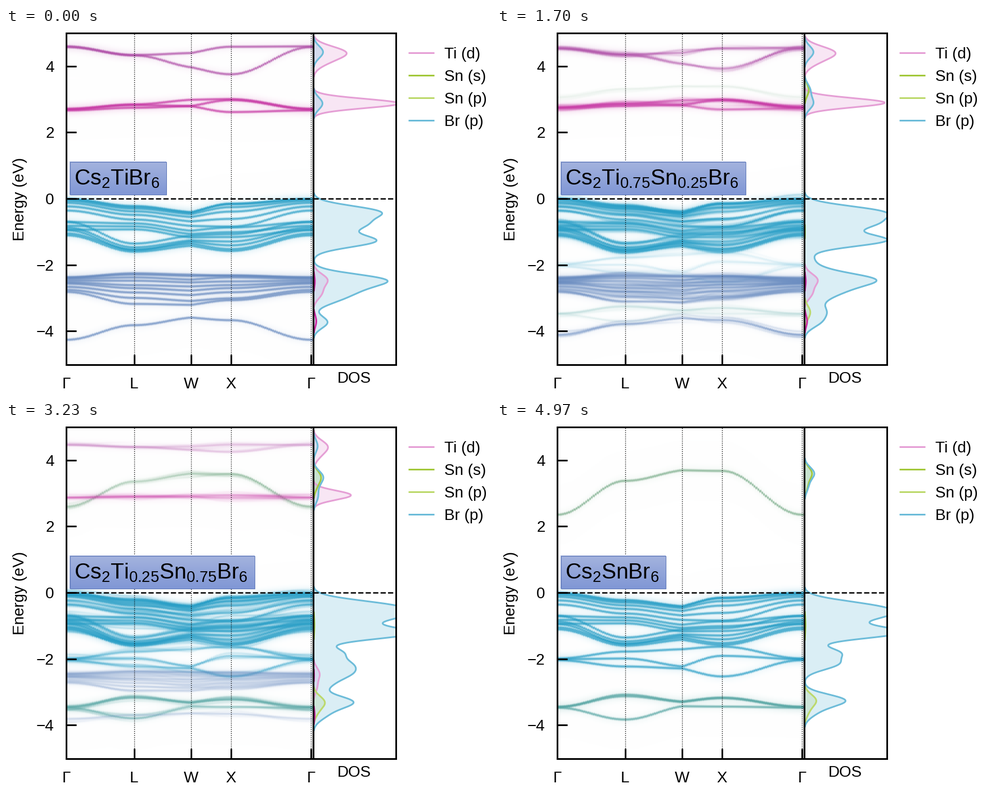
Write a matplotlib script that moves like this. It is 862 by 650 pixels and loops after 5.41 s.

```python
import numpy as np
import matplotlib.pyplot as plt
from matplotlib.animation import FuncAnimation
from matplotlib.patches import Rectangle

W, H, DPI = 862, 650, 64
PT = 72 / DPI                      # points per pixel
STEP, FRAMES = 10, 541
FIRST, HOLD = 1050, 1090           # ms

plt.rcParams.update({
    "font.family": "Liberation Sans",
    "mathtext.fontset": "custom",
    "mathtext.rm": "Liberation Sans",
})

KX = (107, 227.5, 328.5, 399.5, 542)
LEFT, SPLIT, RIGHT, TOP, BOTTOM = 106.5, 546, 692.5, 8.5, 597.5
ROW0, ROWS, COL0, COLS = 9, 589, 107, 439

CYAN, BLUE, PINK, PURPLE = (36, 156, 197), (98, 134, 189), (196, 48, 160), (172, 72, 164)
SAGE, TEAL = (122, 172, 138), (84, 164, 162)
TI_D, SN_S, SN_P, BR_P, TI_P = "#e59fd5", "#a3c83c", "#bcd96c", "#6dbcd9", "#cc2ba2"

rng = np.random.default_rng(7)

fig = plt.figure(figsize=(W / DPI, H / DPI), dpi=DPI, facecolor="white")
ax = fig.add_axes([0, 0, 1, 1])
ax.axis("off")
ax.set_xlim(0, W)
ax.set_ylim(H, 0)


def ypx(e):
    return 303 - 58.87 * np.asarray(e)


# --- band structure -------------------------------------------------------

cols = np.arange(COLS)
kx = np.clip(KX[0] + np.round(cols / 3.4) * 3.4, KX[0], KX[-1])


def smooth(t):
    return (1 - np.cos(np.pi * t)) / 2


EASES = (
    smooth,
    lambda t: 0.6 * smooth(t) + 0.4 * (1 - np.cos(np.pi * t / 2)),
    lambda t: 0.7 * np.sin(np.pi * t / 2) + 0.3 * smooth(t),
    smooth,
)


def path(levels):
    """Energy along the k-path from the values at G, L, W and X."""
    pts = [*levels, levels[0]]
    e = np.zeros(COLS)
    for i, ease in enumerate(EASES):
        on = (kx >= KX[i]) & (kx <= KX[i + 1])
        t = (kx[on] - KX[i]) / (KX[i + 1] - KX[i])
        e[on] = pts[i] + (pts[i + 1] - pts[i]) * ease(t)
    return e


def fan(n, power, *keys, wiggle=0.0):
    """n bands spread between the key bands."""
    t = np.linspace(0, 1, n) ** power * (len(keys) - 1)
    levels = [np.interp(t, range(len(keys)), k) for k in zip(*keys)]
    return np.transpose(levels) + rng.normal(0, wiggle, (n, 4))


UPPER = fan(6, 2, (0, -.22, -.40, -.14), (-.33, -.62, -.80, -.84), wiggle=.012)
MIDDLE = fan(3, 1, (-.70, -.74, -.96, -.86), (-.93, -.92, -1.16, -1.15))
LOWER = fan(5, .6, (-.69, -1.36, -1.10, -1.06), (-1.1, -1.60, -1.41, -1.58), wiggle=.015)
BROMINE = np.vstack([UPPER, MIDDLE, LOWER])
BR_SN = fan(3, 1, (-1.98, -1.77, -1.70, -1.62), (-2.0, -1.98, -2.22, -1.90),
            (-2.03, -2.22, -2.28, -2.52))
BOND = fan(9, 1.4, (-2.34, -2.23, -2.30, -2.28), (-2.80, -3.15, -3.20, -3.10),
           wiggle=.02)
BOND_S = fan(1, 1, (-4.25, -3.81, -3.58, -3.66))
SN_BOND = fan(3, 4, (-3.44, -3.07, -3.28, -3.16), (-3.46, -3.82, -3.42, -3.43))
SN_ANTI = fan(1, 1, (2.36, 3.38, 3.70, 3.68))
T2G = fan(3, 1, (2.72, 2.85, 2.99, 3.01), (2.70, 2.83, 2.80, 2.98),
          (2.67, 2.75, 2.80, 2.62))
EG = fan(2, 1, (4.60, 4.34, 4.40, 4.59), (4.58, 4.33, 3.97, 3.76))

gap = np.subtract.outer(np.arange(ROWS), np.arange(ROWS))
KERNEL = 1.6 * np.exp(-(gap / 1.3) ** 2 / 2) + 0.07 * np.exp(-(gap / 6.5) ** 2 / 2)


def deposit(grid, levels, weight):
    y = ypx(path(levels)) - ROW0
    r = np.floor(y).astype(int)
    f = y - r
    grid[r, cols] += weight * (1 - f)
    grid[r + 1, cols] += weight * f


def fade():
    a, b = rng.uniform(0, 2 * np.pi), rng.uniform(0.008, 0.025)
    return 0.5 + 0.5 * np.sin(a + b * cols)


def density(bands, share, disorder):
    """Sharp bands plus faint broken copies that grow with alloy disorder."""
    grid = np.zeros((ROWS, COLS))
    for levels in bands:
        deposit(grid, levels, 0.85 * share * (1 - 0.4 * disorder))
        for _ in range(round(8 * disorder)):
            shifted = levels + rng.normal(0, 0.075 * disorder, 4)
            deposit(grid, shifted, 0.2 * share * fade())
    return KERNEL @ grid


def band_image(x):
    def pull(bands, home, amount):
        return bands + (home - bands) * amount

    ti, sn, disorder = 1 - x, x ** 1.5, 4 * x * (1 - x)
    layers = (
        (PURPLE, ti, pull(EG, 4.42, x)),
        (SAGE, sn, pull(SN_ANTI, 3.3, 1 - x)),
        (PINK, ti, pull(T2G, 2.94, x)),
        (CYAN, 1, BROMINE),
        (CYAN, sn, BR_SN),
        (BLUE, ti, pull(BOND, -2.55, 0.5 * x)),
        (TEAL, sn, pull(SN_BOND, -3.5, 0.5 * (1 - x))),
        (BLUE, ti, pull(BOND_S, -3.65, x)),
    )
    rgb = np.full((ROWS, COLS, 3), 255.0)
    for color, share, bands in layers:
        a = 1 - np.exp(-density(bands, share, disorder))[..., None]
        rgb = rgb * (1 - a) + np.array(color) * a
    return rgb.clip(0, 255).astype(np.uint8)


# --- density of states ----------------------------------------------------

def dos_peaks(x):
    """Per orbital: (energy, height in px[, width]) at Sn content x."""
    ti, sn = 1 - x ** 2, 1 - (1 - x) ** 2

    def mix(a, b):
        return a + (b - a) * x + 100 * x * (1 - x)

    return {
        TI_D: [(4.42, 52 * ti), (4.14, 20 * ti), (2.87 + .09 * x, 152 * ti, .14),
               (-2.45, 24 * ti), (-2.85, 14 * ti)],
        SN_S: [(3.2 + .4 * x, 13 * sn), (3.2, 5 * sn), (-1, 1.8 * sn, .3)],
        SN_P: [(-3.45 + .2 * x, 20 * sn), (-3.6, 6 * sn)],
        TI_P: [(-2.5, 2.5 * ti), (-3.7, 5 * ti)],
        BR_P: [(4.42, 17 * ti), (2.87, 16 * ti), (3.2 + .4 * x, 17 * sn), (3.2, 6 * sn),
               (-.39, mix(106, 85)), (-.78 + .1 * x, mix(85, 125), .2),
               (-1.28 + .08 * x, mix(108, 170), .185),
               (-1.8, 55 * sn * x ** .5, .16), (-2.15, 57 * sn),
               (-2.45, 118 * ti), (-2.77, 55 * ti), (-3.05, 34 * ti * (1 - x)),
               (-3.73, 25 * ti), (-3.45 + .2 * x, 70 * sn), (-3.6, 18 * sn * x)],
    }


def line(x, y, color="black", lw=3.0, z=6, **kw):
    return ax.plot(x, y, color=color, lw=lw * PT, zorder=z,
                   solid_capstyle="butt", **kw)[0]


def text(x, y, s, size=27.8, **kw):
    return ax.text(x, y, s, fontsize=size * PT, va="baseline", zorder=7, **kw)


def picture(data, x0, x1, y0, y1, z):
    return ax.imshow(data, extent=(x0, x1, y1, y0), aspect="auto",
                     interpolation="nearest", zorder=z)


energy = np.linspace(-4.9, 4.9, 900)
dos_box = Rectangle((SPLIT, TOP), RIGHT - SPLIT, BOTTOM - TOP, transform=ax.transData)


def dos_curve(color, peaks):
    d = np.zeros_like(energy)
    for e, height, *width in peaks:
        s = width[0] if width else .18
        d += height * np.exp(-((energy - e) / s) ** 2 / 2)
    x, y, on = SPLIT + 0.5 + d, ypx(energy), d > 0.6
    fill = ax.fill_betweenx(y, SPLIT, x, where=on, color=color, alpha=0.25, lw=0, zorder=2)
    edge = line(np.where(on, x, np.nan), y, color, 3, 2.5)
    for art in (fill, edge):
        art.set_clip_path(dos_box)
    return [fill, edge]


# --- the five compositions ------------------------------------------------

def formula(x):
    parts = [(s, v) for s, v in (("Ti", 1 - x), ("Sn", x)) if v]
    metal = "".join(s if v == 1 else f"{s}_{{{v:g}}}" for s, v in parts)
    return rf"$\mathrm{{Cs_2{metal}Br_6}}$"


def name_box(x):
    label = text(121, 278.5, formula(x), 39)
    right = round(label.get_window_extent().x1) + 12
    t = np.linspace(0, 1, 59)[:, None, None]
    shade = (1 - t) * np.array([164, 179, 222]) + t * np.array([128, 151, 213])
    rim = Rectangle((113.5, 237.5), right - 113.5, 58, fill=False,
                    ec="#6079b8", lw=PT, zorder=5)
    return [label, ax.add_patch(rim),
            picture(shade.astype(np.uint8), 113, right, 237, 296, 4)]


def scene(x):
    arts = [picture(band_image(x), COL0, COL0 + COLS, ROW0, ROW0 + ROWS, 1)]
    for color, peaks in dos_peaks(x).items():
        arts += dos_curve(color, peaks)
    return arts + name_box(x)


scenes = [scene(x) for x in np.linspace(0, 1, 5)]

# --- axes, ticks and legend -----------------------------------------------

for x0, x1 in ((LEFT, SPLIT), (SPLIT, RIGHT)):
    line([x0, x1], [303, 303], lw=2.5, z=3, ls="--")
for x in KX[1:]:
    line([x, x], [BOTTOM, TOP], lw=1.4, z=3, ls=":")
    line([x, x], [BOTTOM, BOTTOM - 18])
for x, s in zip(KX, "ΓLWXΓ"):
    text(x, 640, s, ha="center")
for e in range(-4, 5, 2):
    y = ypx(e)
    line([LEFT, LEFT + 18], [y, y])
    text(85.5, y + 10, str(e).replace("-", "−"), ha="right")

ax.add_patch(Rectangle((LEFT, TOP), RIGHT - LEFT, BOTTOM - TOP, fill=False,
                       ec="black", lw=3 * PT, zorder=6))
line([SPLIT, SPLIT], [TOP, BOTTOM], lw=3.2)
text(32, 304, "Energy (eV)", ha="center", rotation=90, rotation_mode="anchor")
text(619, 630, "DOS", ha="center")

legend = (("Ti (d)", TI_D), ("Sn (s)", SN_S), ("Sn (p)", SN_P), ("Br (p)", BR_P))
for i, (s, c) in enumerate(legend):
    y = 43.5 + 40 * i
    line([715, 761], [y, y], c)
    text(779, y + 10, s)


def update(i):
    now = max(0, (i * STEP - FIRST) // HOLD + 1)
    for k, arts in enumerate(scenes):
        for art in arts:
            art.set_visible(k == now)
    return scenes[now]


anim = FuncAnimation(fig, update, frames=FRAMES, init_func=lambda: update(0),
                     interval=STEP, repeat=True, repeat_delay=0, blit=False)
plt.show()
```
